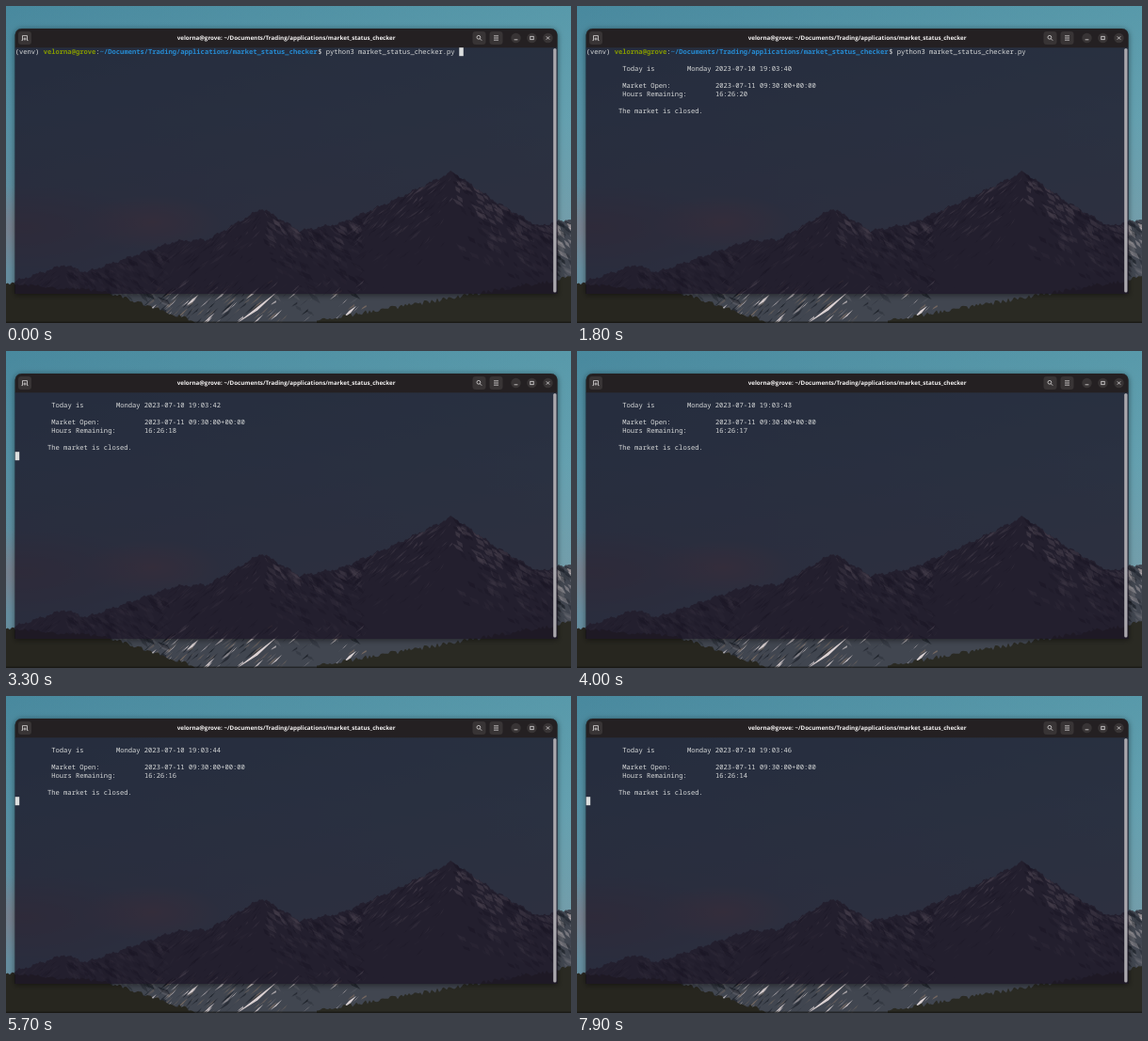
Write an HTML page with a canvas that moves like this. It is 600 px wide and 337 px high and loops after 8 s.

```html
<!DOCTYPE html>
<html lang="en">
<head>
<meta charset="utf-8">
<title>Market status checker</title>
<style>
html, body { margin: 0; width: 100%; height: 100%; overflow: hidden; background: #24231f; }
canvas { display: block; width: 600px; height: 337px; }
</style>
</head>
<body>
<canvas id="stage" width="600" height="337"></canvas>
<script>
const W = 600, H = 337, LOOP = 8000;
const ENTER = 650, FIRST_TICK = 950, BLINK = 600;
const COL = 4.287, ROW = 9, LEFT = 9.7, TOP = 44.2;
const WIN = { x: 9.6, y: 24, w: 576, h: 282, bar: 20 };
const MONO = '"Noto Sans Mono", "DejaVu Sans Mono", monospace';
const SANS = '"Open Sans", "Noto Sans", sans-serif';
const FG = '#d8dada';
const HOST = 'velorna@grove';
const DIR = '~/Documents/Trading/applications/market_status_checker';
const RIDGE = [[0, 296], [62, 275], [85, 283], [180, 250], [215, 248], [272, 215], [312, 239],
  [355, 231], [415, 205], [474, 176], [520, 208], [565, 234], [600, 226]];
const PEAKS = [62, 272, 474];

const ctx = document.getElementById('stage').getContext('2d');

let seed = 11;
function rnd(lo = 0, hi = 1) {
  seed = (seed * 16807) % 2147483647;
  return lo + (hi - lo) * seed / 2147483647;
}

function ridgeY(x) {
  const i = Math.max(1, RIDGE.findIndex(p => p[0] >= x));
  const [x0, y0] = RIDGE[i - 1], [x1, y1] = RIDGE[i];
  const rough = Math.sin(x * 0.33) + 0.7 * Math.sin(x * 0.81) + 0.5 * Math.sin(x * 1.7);
  return y0 + (y1 - y0) * (x - x0) / (x1 - x0) + rough;
}

function box(g, x, y, w, h, r, fill) {
  g.fillStyle = fill;
  g.beginPath();
  g.roundRect(x, y, w, h, r);
  g.fill();
}

function gradient(g, x, y, ...colors) {
  const s = g.createLinearGradient(0, 0, x, y);
  colors.forEach((c, i) => s.addColorStop(i / (colors.length - 1), c));
  return s;
}

function cloud(g, x, y, rx, ry, rgb) {
  g.save();
  g.translate(x, y);
  g.scale(rx, ry);
  const s = g.createRadialGradient(0, 0, 0, 0, 0, 1);
  s.addColorStop(0, `rgba(${rgb},.55)`);
  s.addColorStop(1, `rgba(${rgb},0)`);
  g.fillStyle = s;
  g.fillRect(-1, -1, 2, 2);
  g.restore();
}

// Fills the area below a height function
function land(g, x0, x1, topAt, fill) {
  g.fillStyle = fill;
  g.beginPath();
  g.moveTo(x0, H);
  for (let x = x0; x <= x1; x += 2) g.lineTo(x, topAt(x));
  g.lineTo(x1, H);
  g.fill();
}

// A tapered patch of snow or shade running down a slope
function fleck(g, x, y, dx, dy, t, rgb, a) {
  g.fillStyle = `rgba(${rgb},${a})`;
  g.beginPath();
  g.moveTo(x, y);
  g.lineTo(x + dx * 0.6 + t, y + dy * 0.4);
  g.lineTo(x + dx, y + dy);
  g.lineTo(x + dx * 0.4 - t * 0.5, y + dy * 0.6);
  g.fill();
}

function mountains(g) {
  const snow = '238,226,226', shade = '22,26,34';
  g.save();
  g.beginPath();
  g.moveTo(0, H);
  for (let x = 0; x <= W; x++) g.lineTo(x, ridgeY(x));
  g.lineTo(W, H);
  g.fillStyle = '#414650';
  g.fill();
  g.clip();
  for (let i = 0; i < 1100; i++) {
    const x = rnd(0, W), depth = rnd() * rnd() * 95;
    const y = ridgeY(x) + depth;
    const peak = PEAKS.reduce((a, b) => Math.abs(b - x) < Math.abs(a - x) ? b : a);
    const side = x < peak ? -1 : 1, len = rnd(5, 15);
    const high = Math.max(0.15, Math.min(1, (285 - y) / 85));
    const lit = rnd() < 0.52;
    fleck(g, x, y, side * len * rnd(0.5, 1.2), len * 0.8, rnd(0.6, 2.6),
      lit ? snow : shade, rnd(0.25, 0.8) * (lit ? high : 0.8));
  }
  // Snow gullies at the foot
  for (let i = 0; i < 170; i++) {
    const len = rnd(5, 15);
    fleck(g, 155 + rnd() * rnd(60, 250), rnd(290, 332), -len, len * 0.9, rnd(1, 4),
      [snow, shade, '128,112,100'][i % 3], rnd(0.4, 0.9));
  }
  fleck(g, 290, 302, -46, 36, 9, snow, 0.9);
  fleck(g, 188, 304, -20, 20, 5, snow, 0.8);
  g.restore();
}

function wallpaper(g) {
  g.fillStyle = gradient(g, 0, 240, '#4f92a6', '#5f9bad', '#7397a6');
  g.fillRect(0, 0, W, H);
  g.fillStyle = gradient(g, W, 0, 'rgba(50,105,130,.22)', 'rgba(120,180,185,.22)');
  g.fillRect(0, 0, W, H);
  cloud(g, 155, 230, 75, 30, '190,135,135');
  cloud(g, 20, 235, 130, 45, '135,115,125');
  mountains(g);
  land(g, 0, 212, x => 297 + x * 0.08 + Math.max(0, x - 105) * 0.25 - rnd(0, 4), '#27261f');
  land(g, 330, W, x => 337 - (x - 330) * 0.17 - rnd(0, 5), '#2a2a23');
  g.fillStyle = 'rgba(18,18,16,.6)';
  g.fillRect(0, 335.5, W, 1.5);
}

function line(g, ...pts) {
  g.beginPath();
  for (let i = 0; i < pts.length; i += 2) g.lineTo(pts[i], pts[i + 1]);
  g.stroke();
}

function icons(g) {
  for (const x of [20, 502.5, 520.5]) box(g, x - 7, 27, 14, 14, 3, '#383435');
  for (const x of [541.5, 558.5, 575.5]) box(g, x - 5.2, 28.8, 10.4, 10.4, 5.2, '#383435');
  g.strokeStyle = '#dcdada';
  g.lineWidth = 0.8;
  // New tab
  line(g, 16.5, 36.6, 17.5, 36.6, 17.5, 31.6, 22.5, 31.6, 22.5, 36.6, 23.5, 36.6);
  line(g, 20, 33.4, 20, 36.6);
  line(g, 18.4, 35, 21.6, 35);
  // Search
  g.beginPath();
  g.arc(501.9, 33.3, 1.9, 0, 7);
  g.stroke();
  line(g, 503.3, 34.8, 505.2, 36.7);
  // Menu
  for (const y of [31.8, 34, 36.2]) line(g, 518, y, 523, y);
  // Minimise, maximise, close
  line(g, 539.6, 35.8, 543.4, 35.8);
  g.strokeRect(556.8, 32.3, 3.4, 3.4);
  for (const d of [-1.7, 1.7]) line(g, 575.5 - d, 32.3, 575.5 + d, 35.7);
}

function windowFrame(g) {
  const { x, y, w, h, bar } = WIN, corners = [7, 7, 0, 0];
  // Shadow is drawn only outside the translucent window
  g.save();
  g.beginPath();
  g.rect(0, 0, W, H);
  g.roundRect(x, y, w, h, corners);
  g.clip('evenodd');
  g.shadowColor = 'rgba(0,0,0,.5)';
  g.shadowBlur = 6;
  g.shadowOffsetY = 1;
  box(g, x, y, w, h, corners, '#000');
  g.restore();

  g.fillStyle = 'rgba(28,22,38,.8)';
  g.fillRect(x, y + bar, w, h - bar);
  box(g, x, y, w, bar + 0.3, corners, '#242022');
  box(g, 581.2, 45, 3.3, 259.5, 1.6, '#aaa8ad');
  icons(g);

  g.textRendering = 'geometricPrecision';
  g.font = `bold 6.22px ${SANS}`;
  g.textAlign = 'center';
  g.fillStyle = '#f4f2f2';
  g.fillText(`${HOST}: ${DIR}`, 297.6, 36.1);
}

const back = document.createElement('canvas');
back.width = W;
back.height = H;
const bg = back.getContext('2d');
wallpaper(bg);
windowFrame(bg);

function put(str, col, row, color = FG, weight = 'normal') {
  ctx.font = `${weight} 7.145px ${MONO}`;
  ctx.fillStyle = color;
  ctx.fillText(str, LEFT + col * COL, TOP + row * ROW + 7);
}

function cursor(col, row) {
  ctx.fillStyle = '#dcdede';
  ctx.fillRect(LEFT + col * COL, TOP + row * ROW, COL + 0.2, ROW);
}

// Returns the column after the command
function prompt() {
  const parts = [['(venv) '], [HOST, '#859900', 'bold'], [':'], [DIR, '#268bd2', 'bold'],
    ['$ python3 market_status_checker.py ']];
  let col = 0;
  for (const [str, color, weight] of parts) {
    put(str, col, 0, color, weight);
    col += str.length;
  }
  return col;
}

function report(row, tick) {
  put('Today is', 9, row);
  put(`Monday 2023-07-10 19:03:${40 + tick}`, 25, row);
  put('Market Open:', 9, row + 2);
  put('2023-07-11 09:30:00+00:00', 32, row + 2);
  put('Hours Remaining:', 9, row + 3);
  put(`16:26:${20 - tick}`, 32, row + 3);
  put('The market is closed.', 8, row + 5);
}

function draw(t) {
  ctx.drawImage(back, 0, 0);
  ctx.textRendering = 'geometricPrecision';
  const tick = Math.floor((t - FIRST_TICK) / 1000);
  let end = 0, row = 1;
  if (tick < 1) end = prompt();
  if (tick >= 0) {
    const first = tick === 0 ? 2 : 1;
    report(first, tick);
    row = first + 6;
  }
  if (t < ENTER) cursor(end, 0);
  else if (Math.floor((t - ENTER) / BLINK) % 2 === 0) cursor(0, row);
}

const start = performance.now();
function frame() {
  draw((performance.now() - start) % LOOP);
  requestAnimationFrame(frame);
}
frame();
</script>
</body>
</html>
```
